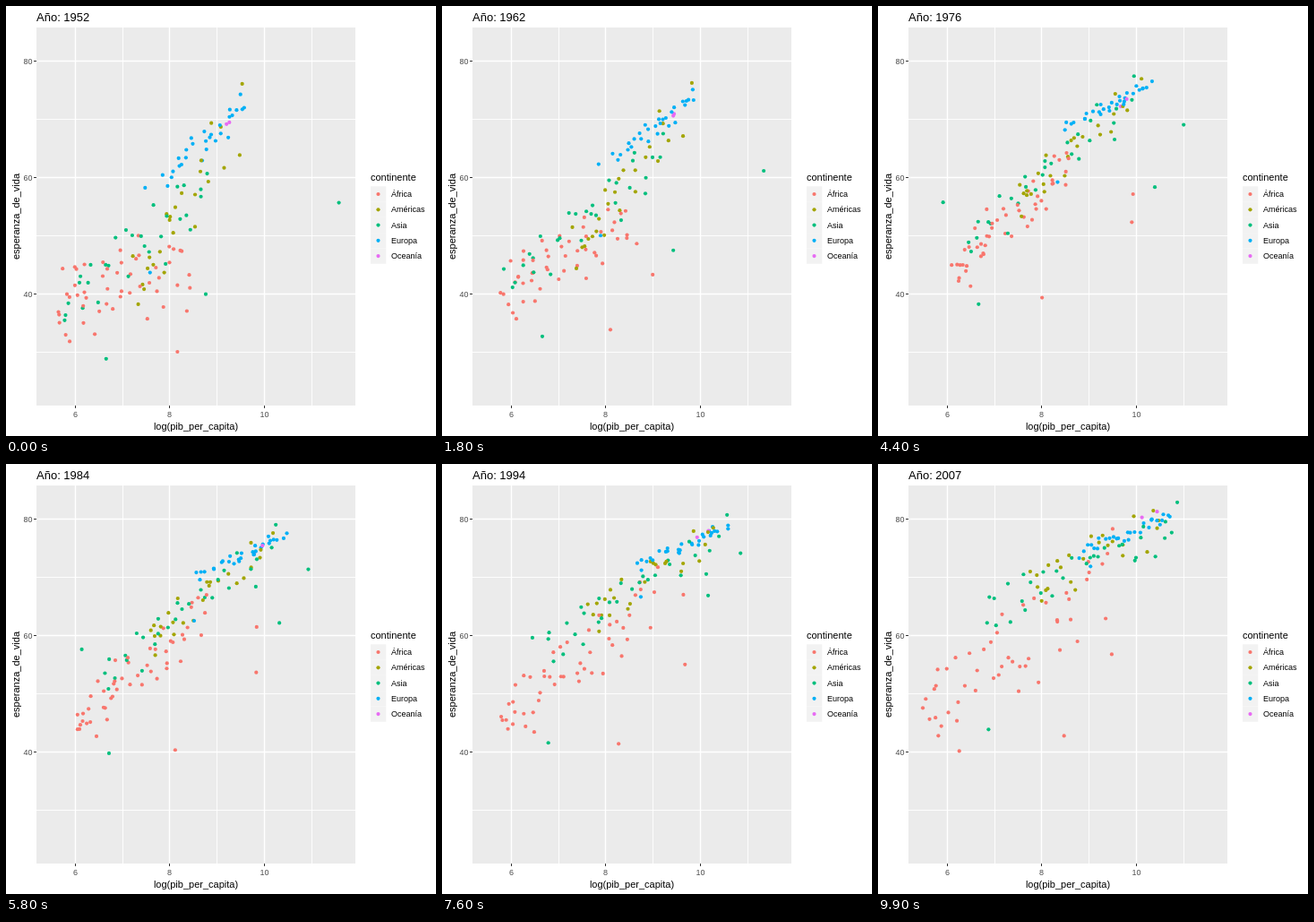
Animation of 480 by 480 pixels, one loop 10 s. Source, as an HTML page:

```html
<!DOCTYPE html>
<html lang="es">
<head>
<meta charset="utf-8">
<style>
  html, body { margin: 0; width: 100%; height: 100%; overflow: hidden; background: #fff; }
  svg { display: block; width: 100vw; height: 100vh; font-family: "Liberation Sans", Arial, sans-serif; }
  .tick { font-size: 9px; fill: #4d4d4d; }
  .name { font-size: 11px; }
  .key { font-size: 9px; }
</style>
</head>
<body>
<svg id="plot" viewBox="0 0 480 480">
  <rect x="34" y="24" width="356" height="422" fill="#ebebeb"/>
  <text id="title" x="34" y="17" font-size="13"></text>
  <text class="name" x="212" y="473" text-anchor="middle">log(pib_per_capita)</text>
  <text class="name" transform="translate(15 235) rotate(-90)" text-anchor="middle">esperanza_de_vida</text>
  <text class="name" x="407" y="195">continente</text>
</svg>
<script>
const plot = document.getElementById('plot');
const title = document.getElementById('title');
const px = v => 77 + (v - 6) * 52.7;
const py = v => 321 - (v - 40) * 6.5;

function add(tag, attrs, text = '') {
  const el = document.createElementNS('http://www.w3.org/2000/svg', tag);
  for (const k in attrs) el.setAttribute(k, attrs[k]);
  el.textContent = text;
  return plot.appendChild(el);
}
const line = (x1, y1, x2, y2, stroke, width) =>
  add('line', { x1, y1, x2, y2, stroke, 'stroke-width': width });
const dot = (fill, cx, cy) => add('circle', { r: 2.1, fill, cx, cy });

// Grid, ticks and tick labels
for (let v = 6; v <= 11; v++) {
  const x = Math.round(px(v)) + 0.5, major = v % 2 === 0;
  line(x, 24, x, 446, '#fff', major ? 1.4 : 0.9);
  if (major) {
    line(x, 446, x, 449, '#333', 1);
    add('text', { x, y: 459, class: 'tick', 'text-anchor': 'middle' }, v);
  }
}
for (let v = 30; v <= 80; v += 10) {
  const y = py(v) + 0.5, major = v % 20 === 0;
  line(34, y, 390, y, '#fff', major ? 1.4 : 0.9);
  if (major) {
    line(31, y, 34, y, '#333', 1);
    add('text', { x: 29.5, y: y + 3, class: 'tick', 'text-anchor': 'end' }, v);
  }
}

// Each band runs from (x0, y0) to (x1, y1) with a vertical spread, in 1952, 1977 and 2007
const continents = [
  { name: 'África', color: '#f8766d', count: 49, skew: 1.3, bands: [
    [5.7, 37, 8.4, 46, 9], [6.15, 43, 8.7, 63, 9], [5.6, 45, 9.4, 69, 11]] },
  { name: 'Américas', color: '#a3a500', count: 25, skew: 1.4, bands: [
    [7.3, 43, 9.5, 69, 9], [7.6, 57, 10.05, 74, 6], [7.8, 69, 10.6, 79, 5]] },
  { name: 'Asia', color: '#00bf7d', count: 29, skew: 1.1, bands: [
    [5.9, 39, 8.9, 56, 9], [6.4, 49, 10, 74, 7], [6.9, 64, 10.8, 80, 5]] },
  { name: 'Europa', color: '#00b0f6', count: 29, skew: 0.8, bands: [
    [7.6, 59, 9.6, 71.5, 3], [8.5, 69, 10.25, 75.5, 2], [8.75, 74, 10.75, 80.5, 2]] },
  { name: 'Oceanía', color: '#e76bf3', count: 2, skew: 1, bands: [
    [9.21, 69.1, 9.27, 69.4, 0], [9.82, 73.5, 9.69, 72.2, 0], [10.45, 81.2, 10.13, 80.2, 0]] }
];

// Countries that leave their band: continent index, then (x, y) in the same years
const outliers = [
  [2, 11.59, 55.6, 11, 69.3, 10.76, 77.6],
  [2, 8.77, 39.9, 10.44, 58.7, 9.98, 72.8],
  [2, 5.8, 36.3, 5.92, 56.1, 6.85, 62.1],
  [2, 6.66, 28.8, 6.67, 38.4, 6.88, 43.8],
  [0, 8.37, 37, 9.95, 52.6, 9.49, 56.7],
  [0, 8.17, 30, 8.01, 39.5, 8.48, 42.7],
  [0, 7.78, 42.7, 9.99, 57.4, 9.4, 74],
  [3, 7.59, 43.6, 8.36, 59.5, 9.04, 71.8]
];

let seed = 1952;
const random = () => (seed = (seed * 16807) % 2147483647) / 2147483647;
const mix = (a, b, f) => a + (b - a) * f;

// Values between three rows at a given age
function at(rows, age) {
  const k = age < 25 ? 0 : 1;
  const f = k ? (age - 25) / 30 : age / 25;
  return rows[k].map((v, i) => mix(v, rows[k + 1][i], f));
}

const countries = [];
for (const { color, count, skew, bands } of continents) {
  for (let i = 0; i < count; i++) {
    const u = (i / (count - 1)) ** skew;
    const start = random() + random() - 1, end = random() + random() - 1;
    const phase = random() * 6.28;
    countries.push({ color, order: random(), place(age) {
      const [x0, y0, x1, y1, spread] = at(bands, age);
      const drift = spread && Math.sin(phase + age / 12) * 0.12;
      return [mix(x0, x1, u) + drift, mix(y0, y1, u) + spread * mix(start, end, age / 55)];
    } });
  }
}
for (const [c, ...v] of outliers) {
  const path = [v.slice(0, 2), v.slice(2, 4), v.slice(4)];
  countries.push({ color: continents[c].color, order: random(), place: age => at(path, age) });
}
countries.sort((a, b) => a.order - b.order);
for (const c of countries) c.dot = dot(c.color, 0, 0);

continents.forEach(({ name, color }, i) => {
  const y = 210 + i * 17.28;
  add('rect', { x: 407, y: y - 8.64, width: 17.28, height: 17.28, fill: '#f2f2f2' });
  dot(color, 415.5, y);
  add('text', { x: 430, y: y + 3.2, class: 'key' }, name);
});

function draw() {
  const step = Math.floor(performance.now() / 100) % 100;
  const age = step * 5 / 9;
  title.textContent = 'Año: ' + Math.round(1952 + age);
  for (const c of countries) {
    const [x, y] = c.place(age);
    c.dot.setAttribute('cx', px(x));
    c.dot.setAttribute('cy', py(y));
  }
  requestAnimationFrame(draw);
}
draw();
</script>
</body>
</html>
```
